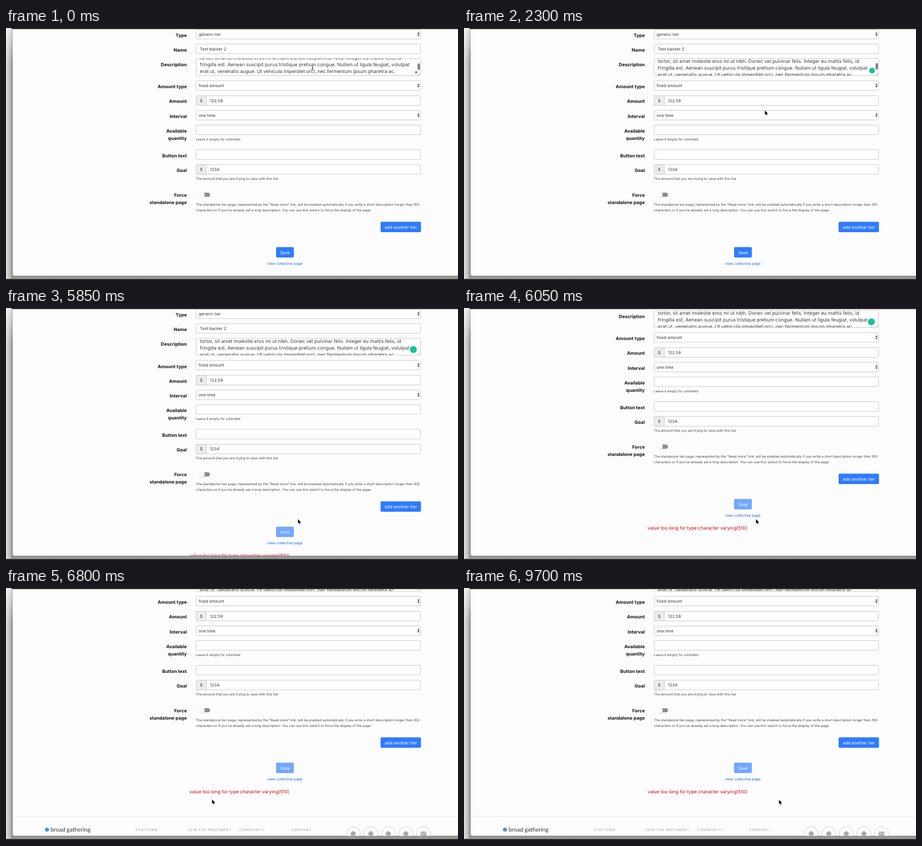
Animation, 800 px wide and 448 px high, one loop 9750 ms. Source, as an HTML page:

```html
<!DOCTYPE html>
<html lang="en">
<head>
<meta charset="utf-8">
<title>Tier form</title>
<style>
html, body { margin: 0; width: 100%; height: 100%; overflow: hidden; background: #fdfdfd; }
svg { display: block; width: 800px; height: 448px; font-family: Inter, sans-serif; text-rendering: geometricPrecision; }
text { white-space: pre; }
</style>
</head>
<body>
<svg id="stage" viewBox="0 0 800 448" xmlns="http://www.w3.org/2000/svg">
  <defs>
    <linearGradient id="side">
      <stop offset="0" stop-color="#dedede"/><stop offset=".5" stop-color="#c4c4c4"/><stop offset="1" stop-color="#8c8c8c"/>
    </linearGradient>
    <linearGradient id="glow" x2="0" y2="1">
      <stop offset="0" stop-color="#fff" stop-opacity=".6"/><stop offset="1" stop-color="#fff" stop-opacity="0"/>
    </linearGradient>
    <linearGradient id="under" x2="0" y2="1">
      <stop offset="0" stop-color="#606060"/><stop offset="1" stop-color="#acacac"/>
    </linearGradient>
    <clipPath id="window"><path d="M12 0H800V440.500H15Q12 440.500 12 437.500Z"/></clipPath>
    <clipPath id="area"><rect x="337" y="54.500" width="396" height="30"/></clipPath>
    <path id="beam" d="M-1.800 -4.200Q0 -4.200 0 -3Q0 -4.200 1.800 -4.200M0 -3V3M-1.800 4.200Q0 4.200 0 3Q0 4.200 1.800 4.200M-1 1H1"/>
  </defs>
  <rect width="12" height="448" fill="url(#side)"/>
  <rect width="12" height="60" fill="url(#glow)"/>
  <rect x="12" y="437" width="788" height="9" fill="url(#under)"/>
  <rect y="446" width="800" height="2" fill="#303030"/>
  <g clip-path="url(#window)">
    <rect x="12" width="788" height="441" fill="#fdfdfd"/>
    <g id="page"></g>
  </g>
  <rect x="10" width="790" height="2" fill="#2b2b2b"/>
  <g id="ibeam" fill="none" stroke-linecap="round">
    <use href="#beam" stroke="#fff" stroke-width="2"/>
    <use href="#beam" stroke="#222" stroke-width=".8"/>
  </g>
  <g id="arrow">
    <g id="denied">
      <circle cx="5.200" cy="11" r="3.700" fill="#fff" stroke="#b5b5b5" stroke-width="1.200"/>
      <path d="M2.700 8.500L7.700 13.500" stroke="#b5b5b5" stroke-width="1.200"/>
    </g>
    <path d="M0 0V7.600L1.800 6L3 8.800L4.300 8.200L3.100 5.500H5.500Z" fill="#000" stroke="#fff" stroke-width=".8" paint-order="stroke"/>
  </g>
</svg>
<script>
const LOOP = 9750, STEP = 50;
const $ = id => document.getElementById(id);
const page = $('page');

function add(tag, attrs, parent = page) {
  const el = document.createElementNS('http://www.w3.org/2000/svg', tag);
  for (const k in attrs) el.setAttribute(k, attrs[k]);
  parent.appendChild(el);
  return el;
}

// y is the middle of the capitals
function text(str, x, y, size, fill, extra = {}, parent = page) {
  const el = add('text', { x, y: y + size * 0.36, 'font-size': size, fill, ...extra }, parent);
  el.textContent = str;
  return el;
}

const label = (str, y) => text(str, 320, y, 8.15, '#111', { 'font-weight': 700, 'text-anchor': 'end' });
const value = (str, x, y) => text(str, x, y, 7.3, '#333');
const help = (str, y) => text(str, 336, y, 6, '#444');

function box(y, h = 18) {
  add('rect', { x: 336.5, y: y + 0.5, width: 397, height: h - 1, rx: 1, fill: '#fff', stroke: '#cecece' });
}

function select(str, y) {
  box(y);
  value(str, 341, y + 9);
  const m = y + 9;
  add('path', { d: `M728 ${m - 0.8}h4l-2 -2.700zM728 ${m + 0.8}h4l-2 2.700z`, fill: '#333' });
}

function money(str, y) {
  box(y);
  add('rect', { x: 336.5, y: y + 0.5, width: 18, height: 17, rx: 1, fill: '#ececec', stroke: '#cecece' });
  text('$', 345.5, y + 9, 7.3, '#444', { 'text-anchor': 'middle' });
  value(str, 361, y + 9);
}

function button(str, x, y, w, fill, ink = '#fff') {
  const g = add('g', {});
  add('rect', { x, y, width: w, height: 18.5, rx: 2, fill }, g);
  text(str, x + w / 2, y + 9.3, 7.6, ink, { 'text-anchor': 'middle' }, g);
  return g;
}

label('Type', 12.7);
select('generic tier', 2);
label('Name', 38.7);
box(28);
value('Test backer 2', 343, 37.3);

label('Description', 65);
box(54, 31);
const clip = add('g', { 'clip-path': 'url(#area)' });
const copy = add('g', {}, clip);
[
  'Lorem ipsum dolor sit amet, consectetur adipiscing elit. Donec cursus, diam sed facilisis',
  'maximus, massa ex imperdiet libero, eget pellentesque leo ipsum quis diam. Aliquam erat',
  'volutpat. Cras vitae orci sed tortor lacinia pharetra. Nam aliquam nulla magna, a ultrices ligula',
  'semper vel. Vivamus dictum, lacus non euismod feugiat, est massa porta',
  'tortor, sit amet molestie eros mi ut nibh. Donec vel pulvinar felis. Integer eu mattis felis, id',
  'fringilla est. Aenean suscipit purus tristique pretium congue. Nullam ut ligula feugiat, volutpat',
  'erat ut, venenatis augue. Ut vehicula imperdiet orci, nec fermentum ipsum pharetra ac.'
].forEach((line, i) => text(line, 343, 58.4 + i * 12, 8.48, '#3a3a3a', {}, copy));
const thumb = add('rect', { x: 728.6, y: 57, width: 4, height: 11.5, rx: 2, fill: '#7d7d7d' });
add('path', { d: 'M729 84L733 80M731.500 84L733 82.500', stroke: '#999', 'stroke-width': 0.7 });
const badge = add('circle', { fill: '#15c39a' });

label('Amount type', 104.3);
select('fixed amount', 93.3);
label('Amount', 130.5);
money('122.59', 120);
label('Interval', 156.8);
select('one time', 146);
label('Available', 183);
label('quantity', 196);
box(172);
help('Leave it empty for unlimited', 198);
label('Button text', 226.8);
box(216);
label('Goal', 253.2);
money('1234', 242.5);
help('The amount that you are trying to raise with this tier', 268);

label('Force', 297);
label('standalone page', 310);
add('rect', { x: 343, y: 292.7, width: 18, height: 7.4, rx: 3.7, fill: '#8d8d8d' });
add('circle', { cx: 346.7, cy: 297, r: 5.6, fill: '#000', opacity: 0.15 });
add('circle', { cx: 346.5, cy: 296.4, r: 5.3, fill: '#fafafa' });
help('The standalone tier page, represented by the "Read more" link, will be enabled automatically if you write a short description longer than 100', 314);
help("characters or if you've already set a long description. You can use this switch to force the display of the page.", 323.5);

button('add another tier', 663, 344.5, 71.5, '#2f7bff');
const save = button('Save', 478, 389.5, 31.5, '#2f7bff');
const loading = button('loading', 473.5, 389.5, 40.5, '#729fcf', '#f2f6fb');
const faded = button('Save', 478, 389.5, 31.5, '#72a7ff', '#f4f8ff');
text('view collective page', 493.5, 418.3, 6.5, '#0f68de', { 'text-anchor': 'middle' });
const error = text('value too long for type character varying(510)', 325, 441, 8.18, '#c80014');

const footer = add('g', {});
add('path', { d: 'M12 485H800', stroke: '#e4e4e4' }, footer);
add('circle', { cx: 72.5, cy: 508.5, r: 3.6, fill: '#4a90e2' }, footer);
text('broad gathering', 79, 508, 10.2, '#333', { 'font-family': 'Lato, sans-serif' }, footer);
[['PLATFORM', 230], ['JOIN THE MOVEMENT', 321], ['COMMUNITY', 413], ['COMPANY', 504.5]]
  .forEach(([s, x]) => text(s, x, 508.7, 6, '#a0a0a0', { 'letter-spacing': 0.8 }, footer));
for (let i = 0; i < 5; i++) {
  const x = 614.5 + i * 31.1;
  add('circle', { cx: x, cy: 516, r: 12.6, fill: '#fdfdfd', stroke: '#c6c6c6', 'stroke-width': 0.8 }, footer);
  if (i < 4) add('circle', { cx: x, cy: 516, r: 4.5, fill: '#a9a9a9' }, footer);
  else {
    add('rect', { x: x - 5, y: 512, width: 10, height: 8, rx: 1, fill: '#a9a9a9' }, footer);
    add('path', { d: `M${x - 4} 513.500l4 3l4 -3`, fill: 'none', stroke: '#fff' }, footer);
  }
}

const clamp = v => Math.max(0, Math.min(1, v));

// keys: [time, ...values], eased between neighbours
function track(keys, t) {
  if (t <= keys[0][0]) return keys[0].slice(1);
  for (let i = 1; i < keys.length; i++) {
    const a = keys[i - 1], b = keys[i];
    if (t <= b[0]) {
      const p = (t - a[0]) / (b[0] - a[0]), e = p * p * (3 - 2 * p);
      return a.slice(1).map((v, j) => v + (b[j + 1] - v) * e);
    }
  }
  return keys[keys.length - 1].slice(1);
}

const textScroll = [[0, 53], [1000, 8], [1400, 0], [1550, 0], [2000, 47]];
const pointer = [
  [2050, 542.5, 70], [2850, 499.5, 401], [5200, 499.5, 401], [5600, 516.8, 375.5],
  [6200, 516.8, 375.5], [6800, 364.7, 376], [7150, 314, 376], [7700, 500, 376],
  [8150, 328, 376], [8650, 500, 376], [9100, 328, 376], [9600, 557.5, 376.5]
];

const show = (el, on) => el.setAttribute('display', on ? 'inline' : 'none');
const move = (el, x, y) => el.setAttribute('transform', `translate(${x} ${y})`);

function draw(t) {
  const [s] = track(textScroll, t);
  move(copy, 0, -s);
  thumb.setAttribute('y', 56.7 + 6.4 * s / 53);
  thumb.setAttribute('opacity', 1 - clamp((t - 2500) / 250));

  const big = clamp((t - 2150) / 200);
  badge.setAttribute('cx', 726 - 5 * big);
  badge.setAttribute('cy', 78.7 - 4.2 * big);
  badge.setAttribute('r', 2.2 + 3.9 * big);

  const p = clamp((t - 5848) / 712);
  move(page, 0, -79 * (1 - (1 - p) ** 3));

  const busy = t >= 3100 && t < 5550;
  show(save, t < 3100);
  show(loading, busy);
  show(faded, t >= 5550);
  show(error, t >= 5550);
  show(footer, t >= 6100);

  const [x, y] = track(pointer, t);
  const typing = y < 85;
  move($('ibeam'), x, y);
  move($('arrow'), x, y);
  show($('ibeam'), typing);
  show($('arrow'), !typing);
  show($('denied'), busy && y > 389);
}

let start = null;
function tick(now) {
  if (start === null) start = now;
  draw(Math.floor(((now - start) % LOOP) / STEP) * STEP);
  requestAnimationFrame(tick);
}
draw(0);
requestAnimationFrame(tick);
</script>
</body>
</html>
```
